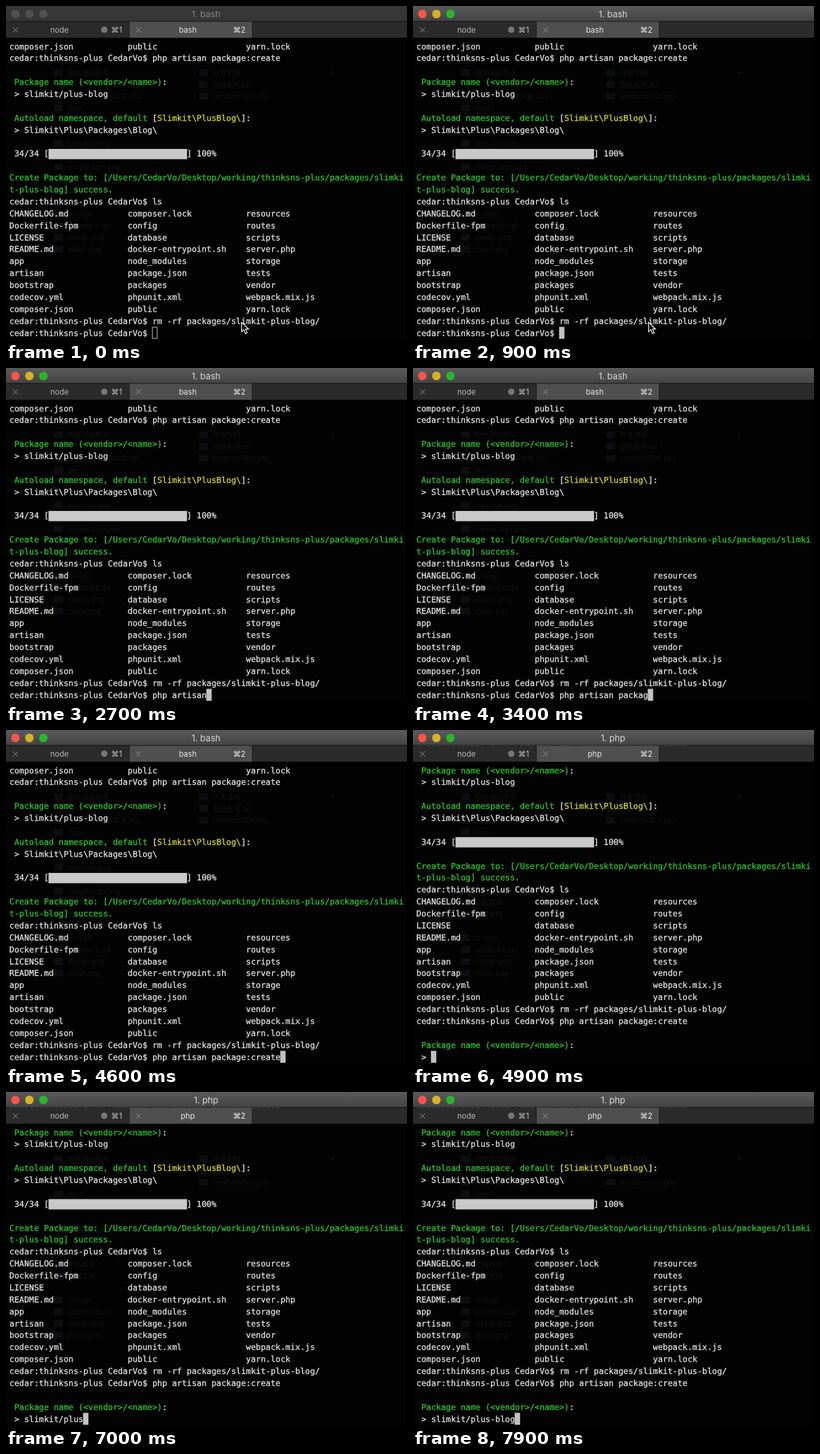
An HTML page for the animation above (8 s loop, 600 by 500 pixels).

```html
<!DOCTYPE html>
<html lang="en">
<head>
<meta charset="utf-8">
<title>Terminal</title>
<style>
  html, body { margin: 0; width: 100%; height: 100%; overflow: hidden; background: #030303; }
  svg { display: block; width: 600px; height: 500px; overflow: hidden; }
  text { white-space: pre; }
  .term { font: 12.25px "DejaVu Sans Mono", monospace; color: #e2e2e2; text-rendering: geometricPrecision; }
  .term tspan, .term text { fill: currentColor; stroke: currentColor; stroke-width: 0.3; }
  .ui { font-family: Inter, "DejaVu Sans", sans-serif; text-anchor: middle; }
  .ghost { font: 10.5px "Noto Sans CJK SC", "Noto Sans", sans-serif; fill: #131313; }
  .g { color: #2cc42c; }
  .y { color: #d4d42c; }
</style>
</head>
<body>
<svg id="stage" viewBox="0 0 600 500" xmlns="http://www.w3.org/2000/svg">
  <defs>
    <linearGradient id="metal" x2="0" y2="1">
      <stop stop-color="#5a5a5a"/>
      <stop offset="1" stop-color="#444"/>
    </linearGradient>
  </defs>
  <rect width="600" height="500" fill="#030303"/>
  <g id="ghost" class="ghost"></g>
  <g id="screen" class="term"></g>
  <rect id="cursor"/>
  <g id="chrome" class="ui">
    <rect id="bar" width="600" height="23"/>
    <rect y="22.5" width="600" height="1" fill="#161616"/>
    <rect y="23.5" width="600" height="24" fill="#2b2b2b"/>
    <rect x="185" y="23.5" width="183.5" height="24" fill="#4f4f4f"/>
    <path d="M184.5 23.5v24M368.5 23.5v24" stroke="#1a1a1a"/>
    <g id="lights"></g>
    <text id="title" x="299.3" y="16.8" font-size="13.2"></text>
    <path d="M10.5 32l7.5 7.5m0-7.5l-7.5 7.5M194.5 32l7.5 7.5m0-7.5l-7.5 7.5" stroke="#999" stroke-width="0.9"/>
    <circle cx="147" cy="35.5" r="4.8" fill="#777"/>
    <g font-size="11.6">
      <text x="80" y="39.8" fill="#b5b5b5">node</text>
      <text x="165.5" y="39.8" fill="#c4c4c4">⌘1</text>
      <text id="tab" x="272" y="39.8" fill="#e8e8e8"></text>
      <text x="349" y="39.8" fill="#f0f0f0">⌘2</text>
    </g>
  </g>
  <path id="pointer" d="M352.5 473.5v14.2l3.3-3.1 2.5 5.8 2.6-1.1-2.5-5.6h4.5z" fill="#080808" stroke="#f2f2f2" stroke-width="1.2"/>
</svg>
<script>
const LOOP = 8000, COL = 7.375, ROW = 17.875, LEFT = 5, TOP = 51.3;
const FOCUS = 400, RUN = 4800;
const $ = id => document.getElementById(id);

function set(el, attrs) {
  for (const k in attrs) el.setAttribute(k, attrs[k]);
}

function add(parent, tag, attrs, text) {
  const el = document.createElementNS("http://www.w3.org/2000/svg", tag);
  set(el, attrs);
  if (text) el.textContent = text;
  parent.appendChild(el);
  return el;
}

// A part is a plain string or [class, string].
function line(row, ...parts) {
  const el = add($("screen"), "text", { x: LEFT, y: TOP + 13.2 + row * ROW });
  for (const p of parts) {
    const [cls, text] = Array.isArray(p) ? p : ["", p];
    add(el, "tspan", { class: cls }, text);
  }
  return el;
}

const prompt = "cedar:thinksns-plus CedarVo$ ";
const command = "php artisan package:create";
const answer = "slimkit/plus-blog";
const files = `CHANGELOG.md composer.lock resources
Dockerfile-fpm config routes
LICENSE database scripts
README.md docker-entrypoint.sh server.php
app node_modules storage
artisan package.json tests
bootstrap packages vendor
codecov.yml phpunit.xml webpack.mix.js
composer.json public yarn.lock`.split("\n")
  .map(l => l.split(" ").map(name => name.padEnd(24)).join(""));

const question = row => line(row, ["g", " Package name (<vendor>/<name>)"], ":");

line(0, files[8]);
line(1, prompt + command);
question(3);
line(4, " > " + answer);
line(6, ["g", " Autoload namespace, default "], "[", ["y", "Slimkit\\PlusBlog\\"], "]:");
line(7, " > Slimkit\\Plus\\Packages\\Blog\\");
line(9, " 34/34 [" + " ".repeat(28) + "] 100%");
add($("screen"), "rect", { x: LEFT + 8 * COL - 0.4, y: TOP + 9 * ROW + 1.8, width: 28 * COL + 0.8, height: 15.4, fill: "#c8c8c8" });
line(11, ["g", "Create Package to: [/Users/CedarVo/Desktop/working/thinksns-plus/packages/slimki"]);
line(12, ["g", "t-plus-blog] success."]);
line(13, prompt + "ls");
files.forEach((f, i) => line(14 + i, f));
line(23, prompt + "rm -rf packages/slimkit-plus-blog/");
const commandLine = line(24, prompt);
question(26);
const answerLine = line(27, " > ");

// Faint file list showing through the translucent window.
const ghosts = [
  [0, 92, "短信测试账号"], [0, 309, "开发文档"], [1, 309, "登陆账号.txt"],
  [2, 92, "项目安排, 取得众意.xlsx"], [2, 309, "sendsmsTest.php"], [3, 92, "docs"],
  [6, 92, "logo-run.png"], [8, 92, "simple.logo.png"], [9, 92, "文档目录"],
  [10, 92, "说明文档"], [12, 92, "ts+logo"], [13, 92, "untitled 6.spl"],
  [14, 92, "xiaoqi-.png"], [15, 92, "zhixin.png"]
];
for (const [row, x, name] of ghosts) {
  const y = 100 + row * 17.6;
  add($("ghost"), "rect", { x: x - 20, y: y - 5, width: 13, height: 10, fill: row % 5 ? "#0e0e0e" : "#0a0e11" });
  add($("ghost"), "text", { x, y: y + 4 }, name);
}
add($("ghost"), "path", { d: "M487 97l4 3-4 3z" });

const lights = ["#fc544c", "#d6b226", "#28b62f"].map((color, i) =>
  ({ color, el: add($("lights"), "circle", { cx: 14 + i * 21, cy: 11.9, r: 6.4 }) }));

// Number of characters typed, interpolated between [time, count] points.
function typed(t, keys) {
  if (t < keys[0][0]) return 0;
  for (let i = 1; i < keys.length; i++) {
    const [t0, n0] = keys[i - 1], [t1, n1] = keys[i];
    if (t < t1) return Math.floor(n0 + (n1 - n0) * (t - t0) / (t1 - t0) + 1e-6);
  }
  return keys[keys.length - 1][1];
}

function draw(t) {
  const focused = t >= FOCUS, running = t >= RUN;
  const cmd = command.slice(0, typed(t, [[1400, 0], [1900, 4], [2000, 4], [3400, 18], [4300, 26]]));
  const ans = answer.slice(0, typed(t, [[5300, 0], [6150, 8], [6400, 8], [7700, 17]]));
  const program = running ? "php" : "bash";

  commandLine.textContent = prompt + cmd;
  answerLine.textContent = " > " + ans;
  set($("screen"), { transform: `translate(0 ${running ? -3 * ROW : 0})` });

  const col = running ? 3 + ans.length : prompt.length + cmd.length;
  const inset = focused ? 0 : 0.5;
  set($("cursor"), {
    x: LEFT + col * COL - 0.3 + inset, y: TOP + 24 * ROW + inset,
    width: 8 - 2 * inset, height: 17.9 - 2 * inset,
    fill: focused ? "#c2c2c2" : "none", stroke: focused ? "none" : "#c2c2c2"
  });

  $("title").textContent = "1. " + program;
  $("tab").textContent = program;
  set($("title"), { fill: focused ? "#dadada" : "#858585" });
  set($("bar"), { fill: focused ? "url(#metal)" : "#363636" });
  for (const { color, el } of lights) set(el, { fill: focused ? color : "#505050" });
  set($("pointer"), { visibility: t < 1400 ? "visible" : "hidden" });
}

const start = performance.now();
function frame(now) {
  draw(Math.max(0, now - start) % LOOP);
  requestAnimationFrame(frame);
}
draw(0);
requestAnimationFrame(frame);
</script>
</body>
</html>
```
